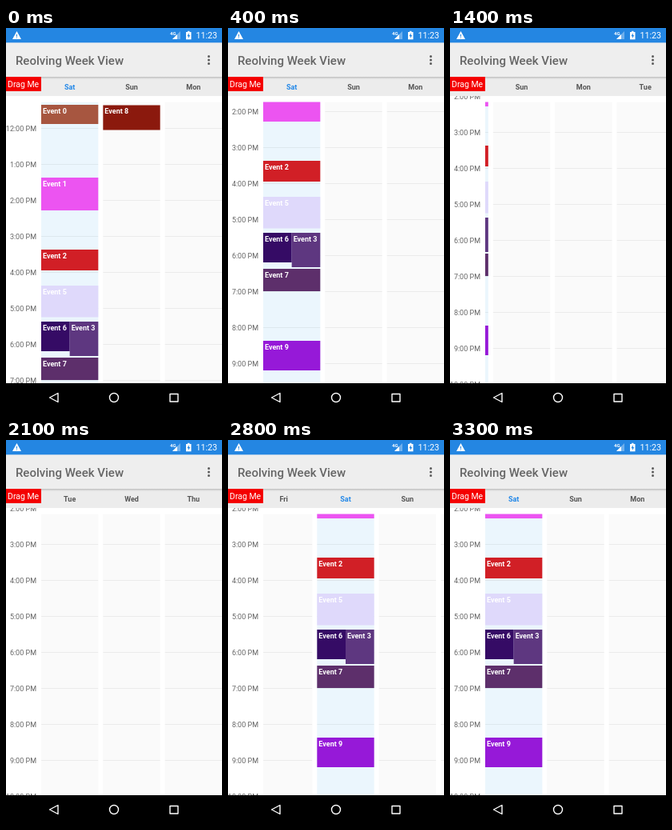
Write an HTML page with a canvas that moves like this. It is 270 by 480 pixels and loops after 3900 ms.

```html
<!DOCTYPE html>
<html>
<head>
<meta charset="utf-8">
<style>
html, body { margin: 0; width: 100%; height: 100%; overflow: hidden; background: #fff; }
canvas { display: block; width: 270px; height: 480px; }
</style>
</head>
<body>
<canvas width="270" height="480"></canvas>
<script>
const canvas = document.querySelector('canvas');
const ctx = canvas.getContext('2d');
const LOOP = 3900, STEP = 100;
const LEFT = 44, HEAD = 61, HEAD_END = 85, GRID = 92.5, BOTTOM = 444;
const PITCH = 232 / 3, COL = PITCH - 6, HOUR = 45, NOON = 125.5;
const DAYS = ['Sat', 'Sun', 'Mon', 'Tue', 'Wed', 'Thu', 'Fri'];

// day, top, bottom, colour, name, left and right share of the column
const EVENTS = [
  [0, 96, 120, '#a75640', 'Event 0'],
  [1, 96.5, 127.5, '#8b190d', 'Event 8'],
  [0, 187, 228, '#ec54f1', 'Event 1'],
  [0, 277, 303, '#d11f26', 'Event 2'],
  [0, 322, 361.5, '#dfd9fb', 'Event 5'],
  [0, 367, 404, '#350b65', 'Event 6', 0, .5],
  [0, 367, 410, '#5e3780', 'Event 3', .5, 1],
  [0, 412, 440, '#5d2f6b', 'Event 7'],
  [0, 502, 539, '#9619d8', 'Event 9'],
];

// Fling distances, one per step
const SCROLL = [30, 76, 111, 125, 129];
const SWIPE_1 = [18, 67.5, 123, 165, 195, 214, 225, 230, 232];
const SWIPE_2 = [15, 75, 145, 201, 242, 272, 291, 302, 308, 7 * PITCH - 232];

function fling(time, start, values) {
  const i = Math.floor((time - start) / STEP);
  return i < 0 ? 0 : values[Math.min(i, values.length - 1)];
}

function rect(x, y, right, bottom, color) {
  ctx.fillStyle = color;
  ctx.fillRect(x, y, right - x, bottom - y);
}

function text(str, x, y, size, color, align = 'left', weight = 400) {
  ctx.font = `${weight} ${size}px Roboto, sans-serif`;
  ctx.textAlign = align;
  ctx.fillStyle = color;
  ctx.fillText(str, x, y);
}

function poly(color, ...points) {
  ctx.beginPath();
  for (let i = 0; i < points.length; i += 2) ctx.lineTo(points[i], points[i + 1]);
  ctx.closePath();
  ctx.fillStyle = color;
  ctx.fill();
}

function clipped(x, y, right, bottom, draw) {
  ctx.save();
  ctx.beginPath();
  ctx.rect(x, y, right - x, bottom - y);
  ctx.clip();
  draw();
  ctx.restore();
}

function drawEvent([day, top, bottom, color, name, from = 0, to = 1], x, scroll) {
  const left = x + COL * from, right = x + COL * to;
  rect(left, top - scroll, right, bottom - scroll, color);
  text(name, left + 2, top - scroll + 10.5, 9, '#fff', 'left', 700);
}

function drawWeek(scroll, swipe) {
  rect(0, HEAD, 270, BOTTOM, '#fff');
  rect(0, HEAD, 270, HEAD_END, '#ececec');

  clipped(0, HEAD_END, LEFT, BOTTOM, () => {
    for (let h = 11; h <= 23; h++) {
      const label = `${h % 12 || 12}:00 ${h < 12 ? 'AM' : 'PM'}`;
      text(label, 38, NOON + (h - 12) * HOUR - scroll + 3.3, 9, '#646464', 'right');
    }
  });

  const first = Math.floor(swipe / PITCH);
  for (let i = first; i <= first + 3; i++) {
    const x = LEFT + i * PITCH - swipe, day = i % 7;
    clipped(LEFT, GRID, 270, BOTTOM, () => {
      rect(x, GRID, x + COL, BOTTOM, day ? '#fafafa' : '#ebf6fd');
      for (let h = 0; h < 12; h++) {
        const y = Math.round(NOON + h * HOUR - scroll - 1);
        rect(x, y, x + COL, y + 1, 'rgba(0,0,0,.06)');
      }
      for (const event of EVENTS) if (event[0] === day) drawEvent(event, x, scroll);
    });
    clipped(LEFT, HEAD, 270, HEAD_END, () =>
      text(DAYS[day], x + COL / 2, 76.6, 9, day ? '#555' : '#2388e8', 'center', 700));
  }

  rect(0, HEAD, LEFT, 79, '#f40000');
  text('Drag Me', 2, 74.3, 10.5, '#fff');
}

function drawBars() {
  rect(0, 0, 270, 18.5, '#2486e2');
  rect(0, 18.5, 270, HEAD, '#eee');
  const shadow = ctx.createLinearGradient(0, HEAD, 0, HEAD + 3);
  shadow.addColorStop(0, 'rgba(0,0,0,.2)');
  shadow.addColorStop(1, 'rgba(0,0,0,0)');
  rect(LEFT, HEAD, 270, HEAD + 3, shadow);

  // Status icons
  poly('#fff', 13.5, 4, 19, 14, 8, 14);
  rect(13, 7.8, 14, 10.8, '#2486e2');
  rect(13, 11.6, 14, 12.6, '#2486e2');
  text('4G', 205, 9, 6, '#fff', 'left', 700);
  poly('rgba(255,255,255,.35)', 218, 4, 218, 14, 208, 14);
  poly('#fff', 214, 8, 214, 14, 208, 14);
  rect(225, 5, 231.5, 14.3, '#fff');
  rect(227, 3.8, 229.5, 5, '#fff');
  poly('#2486e2', 228.8, 6.3, 226.4, 10.2, 227.9, 10.2, 227.9, 13, 230.2, 9, 228.8, 9);
  text('11:23', 264, 13.2, 10.7, '#fff', 'right');

  text('Reolving Week View', 12, 45.5, 15, '#666', 'left', 500);
  ctx.fillStyle = '#5c5c5c';
  for (const y of [35.5, 40, 44.5]) {
    ctx.beginPath();
    ctx.arc(253.5, y, 1.5, 0, 7);
    ctx.fill();
  }

  // Navigation bar
  rect(0, BOTTOM, 270, 480, '#000');
  ctx.strokeStyle = '#fff';
  ctx.lineWidth = 1.4;
  ctx.lineJoin = 'round';
  ctx.stroke(new Path2D('M65 456.5V467.5L54.5 462Z'));
  ctx.stroke(new Path2D('M129.5 462a5.5 5.5 0 1 0 11 0a5.5 5.5 0 1 0 -11 0'));
  ctx.strokeRect(205, 457.5, 10, 9.5);
}

function frame(now) {
  const time = now % LOOP;
  const scroll = fling(time, 200, SCROLL) + fling(time, 1100, [1]);
  const swipe = fling(time, 1300, SWIPE_1) + fling(time, 2400, SWIPE_2);
  drawWeek(scroll, swipe);
  drawBars();
  requestAnimationFrame(frame);
}

const start = performance.now();
frame(0);
function tick() {
  return performance.now() - start;
}
</script>
</body>
</html>
```
